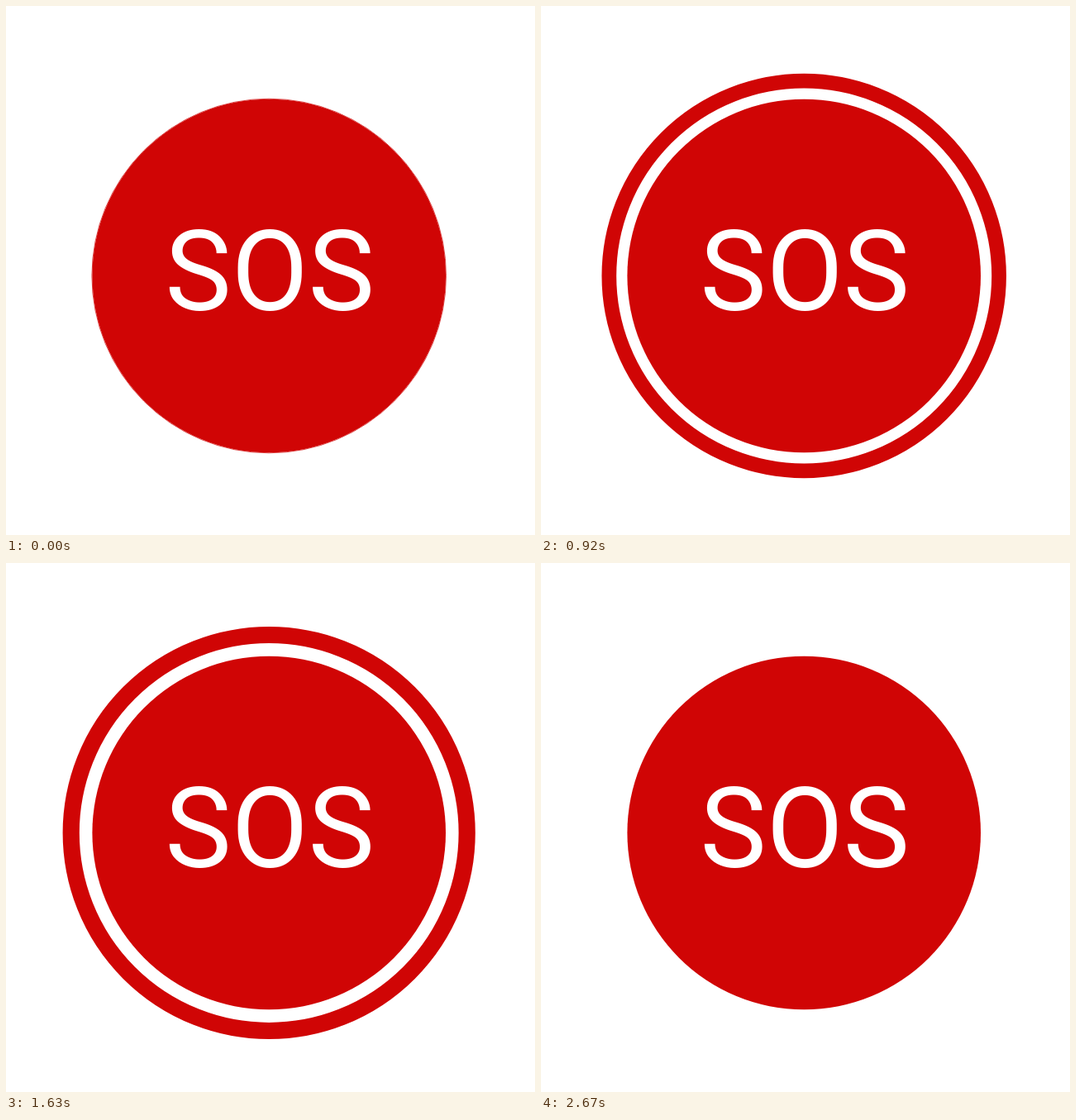
Write an HTML page with a canvas that moves like this. It is 640 by 640 pixels and loops after 2710 ms.

```html
<!DOCTYPE html>
<html lang="en">
<head>
<meta charset="utf-8">
<title>SOS pulse</title>
<style>
  html, body { margin: 0; width: 100%; height: 100%; overflow: hidden; background: #fff; }
  canvas { display: block; width: 640px; height: 640px; }
</style>
</head>
<body>
<canvas id="stage" width="640" height="640"></canvas>
<script>
const ctx = document.getElementById('stage').getContext('2d');
const LOOP = 2710, STEPS = 65, PERIOD = 16.5;
const RED = '#d00505';
const CX = 318.2, CY = 326.5, BUTTON = 213.8;
const REACH = 58.8, THICK = 31.4, PEAK = 8, START = -1.1;

function disc(radius, color) {
  ctx.fillStyle = color;
  ctx.beginPath();
  ctx.arc(CX, CY, radius, 0, Math.PI * 2);
  ctx.fill();
}

// The ring accelerates outwards, then accelerates back while thinning to a hairline.
function ringAt(step) {
  let p = step % PERIOD;
  if (p >= PERIOD + START) p -= PERIOD;
  if (p <= PEAK) {
    const u = (p - START) / (PEAK - START);
    return { outer: BUTTON + REACH * u ** 2, width: THICK * u ** 1.78 };
  }
  const u = p - PEAK;
  return {
    outer: BUTTON + REACH * (1 - (u / 5.61) ** 1.9),
    width: Math.max(0.7, THICK * (1 - (u / 5.06) ** 2))
  };
}

function draw(time) {
  const step = Math.floor((time % LOOP) * STEPS / LOOP + 0.2) % STEPS;
  const ring = ringAt(step);
  ctx.fillStyle = '#fff';
  ctx.fillRect(0, 0, 640, 640);
  if (ring.outer > BUTTON) {
    ctx.strokeStyle = RED;
    ctx.lineWidth = ring.width;
    ctx.beginPath();
    ctx.arc(CX, CY, ring.outer - ring.width / 2, 0, Math.PI * 2);
    ctx.stroke();
  }
  disc(BUTTON, RED);
  ctx.fillStyle = '#fff';
  ctx.font = '400 135px Roboto, sans-serif';
  ctx.fillText('SOS', 192.6, 367.8);
}

let begin;
function tick(now) {
  begin ??= now;
  draw(now - begin);
  requestAnimationFrame(tick);
}
draw(0);
requestAnimationFrame(tick);
</script>
</body>
</html>
```
